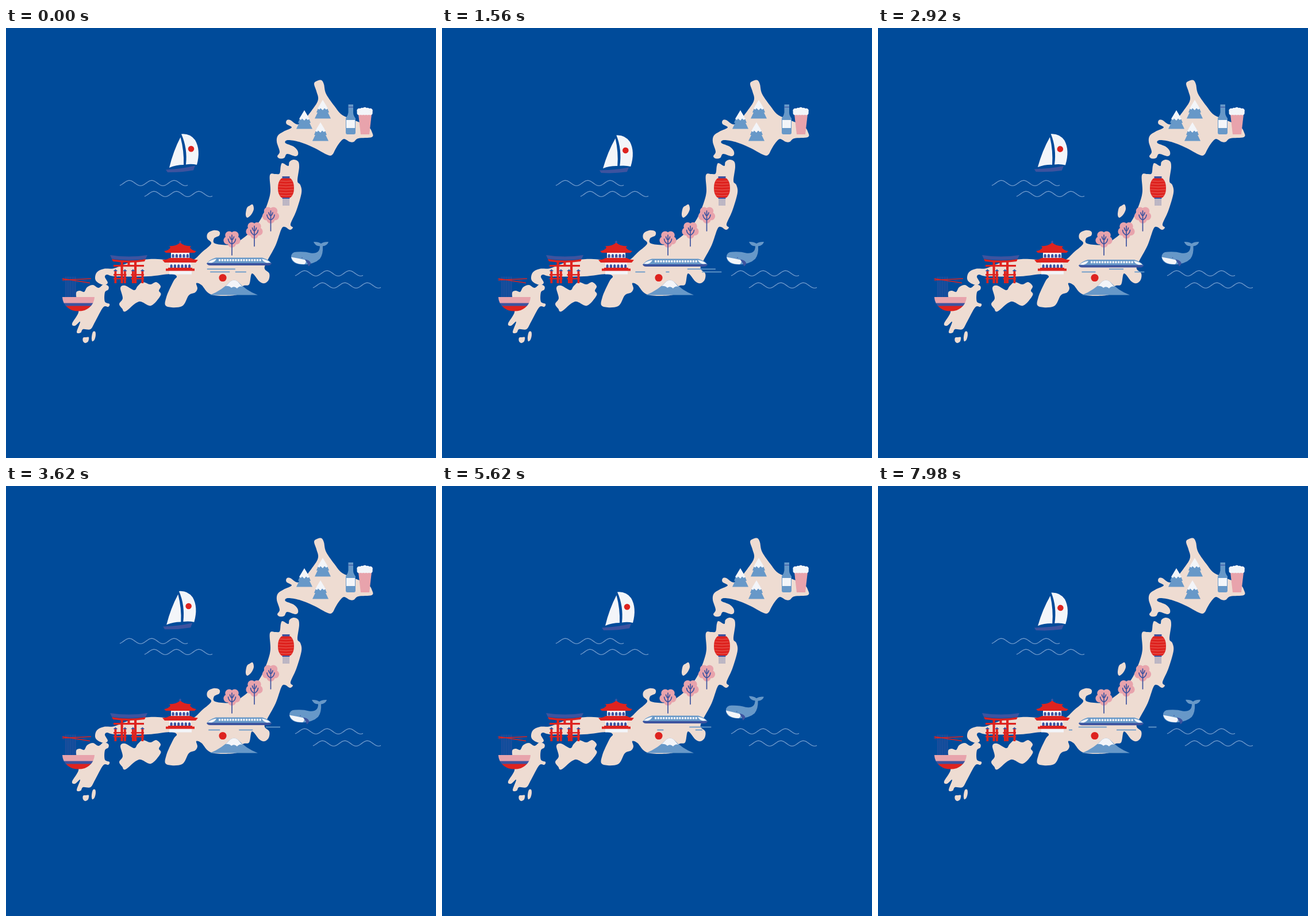
An HTML page with a canvas for the animation above (8000 ms loop, 748 by 748 pixels).

```html
<!DOCTYPE html>
<html lang="en">
<head>
<meta charset="utf-8">
<title>Island map</title>
<style>
  html, body { margin: 0; width: 100%; height: 100%; overflow: hidden; background: #004b9a; }
  canvas { display: block; width: 100vw; height: 100vh; }
</style>
</head>
<body>
<canvas id="stage" width="748" height="748"></canvas>
<script>
const SIZE = 748, LOOP = 8, SWAY = 5.64, TAU = Math.PI * 2;
const SEA = '#004b9a', LAND = '#eedcd2', RED = '#de231f', BLUE = '#6798c8',
      INDIGO = '#3d539f', PINK = '#e8a3ac', WHITE = '#f3f5f9';

const canvas = document.getElementById('stage');
const ctx = canvas.getContext('2d');
const ratio = window.devicePixelRatio || 1;
canvas.width = canvas.height = SIZE * ratio;

// ---------- helpers ----------
function fill(color, d) {
  ctx.fillStyle = color;
  ctx.fill(new Path2D(d));
}

function stroke(color, width, d) {
  ctx.strokeStyle = color;
  ctx.lineWidth = width;
  ctx.stroke(new Path2D(d));
}

function rect(color, x, y, w, h) {
  ctx.fillStyle = color;
  ctx.fillRect(x, y, w, h);
}

function disc(color, x, y, r) {
  ctx.fillStyle = color;
  ctx.beginPath();
  ctx.arc(x, y, r, 0, TAU);
  ctx.fill();
}

function at(x, y, draw, angle = 0) {
  ctx.save();
  ctx.translate(x, y);
  ctx.rotate(angle * Math.PI / 180);
  draw();
  ctx.restore();
}

// Closed smooth outline through a few key points.
function blob(text) {
  const pts = text.trim().split(/\s+/).map(p => p.split(',').map(Number));
  const n = pts.length, path = new Path2D();
  path.moveTo(...pts[0]);
  for (let i = 0; i < n; i++) {
    const [a, b, c, d] = [n - 1, 0, 1, 2].map(k => pts[(i + k) % n]);
    path.bezierCurveTo(b[0] + (c[0] - a[0]) / 6, b[1] + (c[1] - a[1]) / 6,
                       c[0] - (d[0] - b[0]) / 6, c[1] - (d[1] - b[1]) / 6, c[0], c[1]);
  }
  return path;
}

// ---------- land ----------
const islands = [
  // north
  `536,97 541,92 549,91 553,98 557,115 573,138 583,150 597,157 628,170 637,182 636,190 613,192
   605,198 598,198 588,193 580,200 573,211 568,220 560,221 535,208 510,198 490,195 486,200
   500,206 507,213 508,220 503,223 489,219 484,226 476,227 472,223 476,215 471,198 473,187
   483,180 497,173 488,167 488,161 494,160 511,167 535,139 543,124 540,110`,
  // main
  `478,240 481,235 491,240 493,233 500,229 508,232 510,242 507,266 512,273 514,287 505,318
   495,341 499,347 494,351 485,346 479,350 469,378 453,408 450,419 458,427 457,438 450,444
   441,441 428,427 423,446 412,449 402,464 358,464 340,447 331,444 333,453 329,460 318,465
   306,484 279,484 279,468 291,441 297,432 285,428 247,432 190,432 176,429 172,433 177,443
   171,447 160,443 155,436 158,425 170,419 188,418 215,408 250,402 290,404 322,405 342,389
   357,375 350,366 351,357 361,352 371,354 371,361 362,366 364,375 392,377 412,366 430,350
   444,331 455,305 460,284 459,256 469,254 476,253`,
  // south
  `122,461 128,457 136,459 141,451 151,447 161,452 170,446 178,449 178,455 172,460 172,476
   180,480 178,485 169,486 155,511 147,524 134,524 130,530 123,529 129,511 120,518 115,514
   126,495 124,480`,
  // east of the south
  `197,480 203,470 199,452 207,448 223,456 229,449 238,442 251,446 261,442 269,449 266,457
   269,465 252,483 231,476 208,493 202,488`,
  '134,539 139,538 144,538 143,545 138,548 134,545',
  '151,529 155,528 156,534 154,542 150,545 149,538',
  '419,313 424,309 429,307 431,315 427,324 420,330 417,325'
].map(blob);

// ---------- landmarks ----------
function peak() {
  fill(BLUE, 'M-7 12L-11 22H-9L-14 32.5H14L9 22H11L7 12Z');
  fill(WHITE, 'M0 0L9 15L6 17L3 14.5L0 18L-4 14.5L-6 17L-9 15Z');
}

function drinks() {
  fill(BLUE, 'M595.5 133H604V147Q604 152 608 157V182Q608 185 605 185H594Q591 185 591 182V157Q595 152 595.5 147Z');
  rect(INDIGO, 595.5, 137, 8.5, 1.2);
  rect(WHITE, 592, 160, 15, 14);
  fill(PINK, 'M613 150H636L632 185H617Z');
  for (let i = 0; i < 5; i++) {
    const x = 614.5 + i * 4.8;
    disc(WHITE, x, 147.5, 4);
    disc(WHITE, x, 142 + Math.abs(i - 2), 4.2);
  }
}

function lantern() {
  rect('#c3bbc6', 481, 296, 12, 13);
  for (let x = 482.5; x < 493; x += 2.5) stroke('#a9a8be', 0.6, `M${x} 297V309`);
  rect(INDIGO, 480.5, 258, 13, 6);
  rect(INDIGO, 480.5, 292, 13, 5);
  fill(RED, 'M479 261.5H495Q501 267 501 278.5Q501 290 495 295H479Q473 290 473 278.5Q473 267 479 261.5Z');
  for (let y = 266; y < 294; y += 5) {
    const w = 13.6 - Math.abs(y - 278.5) * 0.2;
    stroke('#ee7a70', 0.7, `M${487 - w} ${y}Q487 ${y + 1.5} ${487 + w} ${y}`);
  }
}

function tree() {
  for (let i = 0; i < 5; i++) {
    const a = (i + 0.25) * TAU / 5;
    disc(PINK, Math.cos(a) * 8, Math.sin(a) * 8, 7);
  }
  ctx.lineCap = 'round';
  stroke(INDIGO, 1.7, 'M0 -7V28M0 9Q6 6 6.5 0M0 9Q-6 6 -6.5 0M0 2Q3 0 3.5 -4M0 2Q-3 0 -3.5 -4');
  ctx.lineCap = 'butt';
}

function volcano() {
  disc(RED, 377, 434.5, 6.6);
  fill(BLUE, 'M355 464.5Q376 456 390 441Q397 436 403 441Q418 457 438 464.5Z');
  fill(WHITE, 'M382 449Q386 445 390 441Q397 436 403 441L411 450Q406 448 402 453Q397 448 392 452Q388 448 382 449Z');
}

function pagoda() {
  const arches = (x, y, count) => {
    for (let i = 0; i < count; i++, x += 6.3)
      fill(INDIGO, `M${x} ${y + 7.5}V${y + 3}Q${x + 2.1} ${y - 1} ${x + 4.2} ${y + 3}V${y + 7.5}Z`);
  };
  rect(WHITE, 284, 421, 39, 7.5);
  rect(WHITE, 287, 390, 32, 12);
  rect(WHITE, 284, 407, 38, 12);
  rect(INDIGO, 302.2, 370, 1.8, 6);
  disc(INDIGO, 303, 372.5, 2);
  fill(RED, 'M302 374H304Q309 379 322 379.5L320 382Q323 387 331 388L328 391H278L275 388Q283 387 286 382L284 379.5Q297 379 302 374Z');
  arches(288.5, 392, 5);
  fill(RED, 'M285 400H321Q326 403 334 403.5L330 408H276L272 403.5Q280 403 285 400Z');
  arches(285.5, 410, 6);
  rect(RED, 282, 417, 42, 2);
  rect(RED, 278, 418.5, 50, 4);
}

function gate() {
  [199.5, 223].forEach(x => rect(RED, x, 406, 4.2, 38));
  rect(RED, 211.5, 407, 4, 6);
  fill(RED, 'M184 402Q214 407 243 402L241 406Q214 410 186 406Z');
  rect(RED, 187, 412, 53, 3.2);
  fill(INDIGO, 'M181 395Q214 400 246 395L243 401.5Q214 406 184 401.5Z');
  [188.5, 205, 219, 235.5].forEach(x => {
    rect(RED, x, 423, 3.8, 21);
    fill(INDIGO, `M${x - 2} 423L${x + 1.9} 419.5L${x + 5.8} 423Z`);
  });
  [187, 217.5].forEach(x => {
    rect(RED, x, 428, 22.5, 2.5);
    rect(RED, x, 435, 22.5, 2.2);
  });
}

function noodles() {
  for (let x = 104; x < 121; x += 2.8) stroke(INDIGO, 1, `M${x} 432.5V468`);
  stroke(RED, 1.7, 'M98 438.5L148 436M98 436L146 443.5');
  ctx.save();
  ctx.clip(new Path2D('M98 468H154Q153 484 137 491Q126 494 115 491Q99 484 98 468Z'));
  rect(PINK, 97, 467, 58, 12);
  rect(INDIGO, 97, 478.5, 58, 5.5);
  rect(RED, 97, 483.5, 58, 11);
  ctx.restore();
}

function wave(dx, dy) {
  let d = '';
  for (let x = 198; x <= 316; x += 2) {
    const y = 269.8 - 4.6 * Math.cos((x - 214.5) / 39 * TAU);
    d += (d ? 'L' : 'M') + (x + dx) + ' ' + (y + dy);
  }
  stroke('#6f9acc', 1.3, d);
}

// ---------- moving parts (time in seconds) ----------
function train(t) {
  at(0, 1.8 * (1 - Math.cos(t / SWAY * TAU)), () => {
    fill(BLUE, 'M349 410Q353 403 365 399.5H446Q458 403 462 410Z');
    fill(WHITE, 'M351 408Q356 403 366 401.5Q364 407 357 408.5ZM460 408Q455 403 445 401.5Q447 407 454 408.5Z');
    fill(INDIGO, 'M349 409H462Q461 413 456 413H355Q350 413 349 409Z');
    for (let x = 370; x < 442; x += 4.7) rect(WHITE, x, 402, 3.2, 3.6);
  });
}

// Wind streaks per row as [start time, width]; short ones travel faster.
const rows = [
  { y: 419.4, period: LOOP, list: [[-0.42, 49], [1.9, 25], [3.89, 38], [6.31, 14]] },
  { y: 424.4, period: 7.02, list: [[-0.89, 19], [-0.42, 34], [0.93, 6], [1.47, 17],
                                   [2.57, 24], [3.32, 20], [4.34, 12], [5.11, 11]] }
];

function streaks(t) {
  for (const { y, period, list } of rows) {
    for (const [start, width] of list) {
      const age = (t - start) % period;
      const tail = 329 + 105 * Math.exp(-width / 65) * age;
      if (age < 0 || tail + width > 488) continue;
      stroke(BLUE, 1.8, `M${tail} ${y}h${width}`);
    }
  }
}

function boat(t) {
  const a = t / SWAY * TAU;
  const tilt = 1.5 * (Math.cos(a - 2.27) - Math.cos(2.27));
  at(302.2 + 2.8 * Math.cos(a), 225 + 2 * Math.sin(a), () => {
    ctx.translate(-305, -225);
    fill(WHITE, 'M303.5 190Q291 214 284 243Q296 238 309 238Q310 214 303.5 190Z');
    fill(WHITE, 'M305 184.5Q320 183 329 195Q339 212 332 238Q323 236 313 237.5Q316 209 305 184.5Z');
    disc(RED, 322, 210.3, 5.3);
    fill(INDIGO, 'M278 246.5Q306 245 329 239.5L326 247.5Q304 251.5 281 251Z');
  }, tilt);
}

function whale(t) {
  const drift = 1.5 * (Math.cos(t / LOOP * TAU) - 1);
  const lift = Math.sin(Math.PI * Math.max(0, t - 3.8) / 4.2);
  at(525 + drift, 393.5 - 7 * lift, () => {
    ctx.translate(-525, -393);
    fill(BLUE, 'M496 398Q496 389 506 389Q520 388 530 391Q546 393 546 379Q538 379 535 371.5Q543 371 548 374.5Q553 371 561 371.5Q559 378 551 379Q552 393 546 401Q537 410 518 411Q497 411 496 398Z');
    fill(WHITE, 'M496 398Q508 400 521 403Q523 408 519 410.5Q500 411 496 398Z');
    fill(INDIGO, 'M519.5 402Q528 403 530 408Q530 412 526 414Q525 408 519.5 402Z');
    disc(INDIGO, 515, 399, 0.8);
  }, 2.5 * lift);
}

function scene(t) {
  rect(SEA, 0, 0, SIZE, SIZE);
  ctx.fillStyle = LAND;
  islands.forEach(p => ctx.fill(p));

  [[0, 0], [43, 19], [305, 157], [336, 178]].forEach(w => wave(...w));
  [[551, 125], [519, 143], [547, 164]].forEach(p => at(...p, peak));
  drinks();
  lantern();
  [[393, 367], [432, 351.5], [460.5, 325]].forEach(p => at(...p, tree));
  volcano();
  pagoda();
  gate();
  noodles();
  streaks(t);
  train(t);
  boat(t);
  whale(t);
}

const start = performance.now();
function frame(now) {
  ctx.setTransform(ratio, 0, 0, ratio, 0, 0);
  scene(Math.max(0, now - start) / 1000 % LOOP);
  requestAnimationFrame(frame);
}
frame(start);
</script>
</body>
</html>
```
